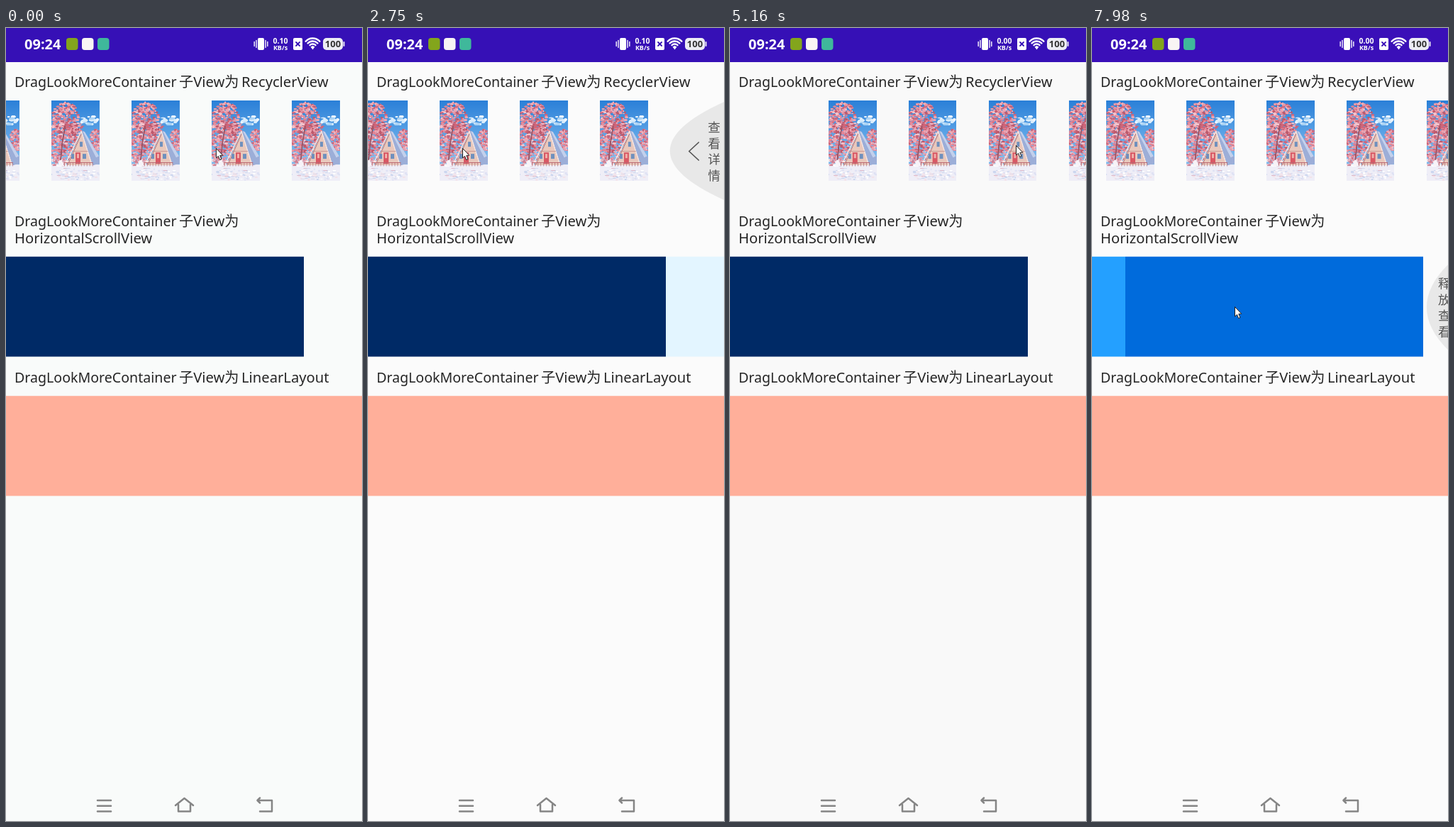
An HTML page with a canvas for the animation above (8 s loop, 502 by 1116 pixels).

```html
<!DOCTYPE html>
<html lang="zh">
<head>
<meta charset="utf-8">
<style>
  html, body { margin: 0; width: 502px; height: 1116px; overflow: hidden; background: #f9f9f9; }
  canvas { display: block; }
</style>
</head>
<body>
<canvas id="stage" width="502" height="1116"></canvas>
<script>
const LOOP = 8000, W = 502, H = 1116;
const PITCH = 112.9, MARGIN = 20, LAST_ITEM_SCROLL = 633;
const PANE = 420, PANE_TOP = 321.8, PANE_HEIGHT = 140.7, PANE_SCROLL = 1178;
const DAMPING = 0.6;
const ctx = document.getElementById('stage').getContext('2d');
const CJK = '"Noto Sans CJK SC", sans-serif';
const LATIN = '"Noto Sans", ' + CJK;

const ramp = (t, from, to) => Math.min(1, Math.max(0, (t - from) / (to - from)));
const easeOut = u => 1 - (1 - u) ** 2;
const smooth = (t, from, to) => { const u = ramp(t, from, to); return u * u * (3 - 2 * u); };
const bump = (t, start, end, fade) => ramp(t, start, start + fade) * (1 - ramp(t, end - fade, end));
const strokes = (t, from, to, count, size) => size * Math.sin(Math.PI * count * ramp(t, from, to)) ** 2;

// Every drag moves the pointer and, through damping, the content it pulls.
function poseAt(t) {
  const pullLeft = 163 * easeOut(ramp(t, 0, 2650));
  const pullRight = 198 * smooth(t, 4620, 5160);
  const paneDrag = 173 * ramp(t, 5720, 6060);
  const panePull = 70 * ramp(t, 7500, 7980);
  return {
    cursorX: 296 - pullLeft + 72 * smooth(t, 3000, 4300) + strokes(t, 3000, 4300, 3, 80) + pullRight
      - 190 * smooth(t, 5300, 5700) - paneDrag
      + 231 * smooth(t, 6150, 7450) + strokes(t, 6150, 7450, 2, 90) - panePull,
    cursorY: 169 - 4 * ramp(t, 3000, 5160) + 222 * smooth(t, 5300, 5700) + 5 * ramp(t, 6060, 7980),
    listScroll: LAST_ITEM_SCROLL * (1 - smooth(t, 3000, 4250)),
    listStretch: 1 + 0.025 * bump(t, 4200, 4600, 150),
    listPull: DAMPING * (pullLeft * (1 - smooth(t, 2660, 2960)) - pullRight * (1 - smooth(t, 5220, 5450))),
    paneScroll: paneDrag + (PANE_SCROLL - 173) * ramp(t, 6150, 7500),
    panePull: panePull / 2,
    barAlpha: 0.3 * bump(t, 5750, 7800, 200),
    toast: bump(t, 2900, 4950, 150),
    bright: (t >= 2390 && t < 4650) || t >= 5670
  };
}

function rect(g, x, y, w, h, fill, radius = 0) {
  g.fillStyle = fill;
  g.beginPath();
  g.roundRect(x, y, w, h, radius);
  g.fill();
}

function trace(g, points) {
  g.beginPath();
  for (let i = 0; i < points.length; i += 2) g.lineTo(points[i], points[i + 1]);
}

function poly(g, fill, ...points) {
  trace(g, points);
  g.fillStyle = fill;
  g.fill();
}

function line(g, stroke, width, ...points) {
  trace(g, points);
  g.strokeStyle = stroke;
  g.lineWidth = width;
  g.lineJoin = g.lineCap = 'round';
  g.stroke();
}

function text(str, x, y, font, fill, align = 'left') {
  ctx.font = font;
  ctx.fillStyle = fill;
  ctx.textAlign = align;
  ctx.fillText(str, x, y);
}

function makePicture() {
  const scale = 2, pic = document.createElement('canvas');
  pic.width = 68 * scale;
  pic.height = 113 * scale;
  const g = pic.getContext('2d');
  g.scale(scale, scale);
  let seed = 11;
  const rnd = () => (seed = seed * 16807 % 2147483647) / 2147483647;
  const dabs = (count, x, y, rx, ry, size, colors) => {
    for (let i = 0; i < count; i++) {
      const a = rnd() * Math.PI * 2, r = Math.sqrt(rnd());
      g.fillStyle = colors[Math.floor(rnd() * colors.length)];
      g.beginPath();
      g.ellipse(x + Math.cos(a) * r * rx, y + Math.sin(a) * r * ry, size * (0.5 + rnd()), size * (0.4 + rnd() / 2), 0, 0, 7);
      g.fill();
    }
  };
  const sky = g.createLinearGradient(0, 0, 0, 80);
  sky.addColorStop(0, '#2b80d8');
  sky.addColorStop(1, '#7fbdf0');
  rect(g, 0, 0, 68, 113, sky);
  dabs(30, 55, 28, 14, 6, 2.4, ['#d8ecfb', '#a9d2f4', '#eef6fd']);

  const pinks = ['#e08496', '#d0667b', '#eca6b3', '#f4c3cb', '#bd5a6d', '#e5919f'];
  dabs(230, 19, 24, 19, 23, 1.9, pinks);
  dabs(330, 13, 58, 21, 31, 1.9, pinks);
  dabs(110, 36, 44, 10, 13, 1.7, pinks);
  dabs(110, 63, 56, 9, 16, 1.7, pinks);
  line(g, '#9a5565', 1.8, 12, 92, 15, 60, 19, 36);

  rect(g, 0, 90, 68, 23, '#efeef7');
  dabs(45, 9, 87, 14, 5, 1.6, ['#f5e6ec', '#e2b4c0', '#cf8093', '#ffffff']);
  poly(g, '#e9c8bc', 42, 45, 21, 91, 57, 91);
  poly(g, '#9caed8', 42, 43, 46, 43, 68, 79, 68, 89, 57, 91);
  poly(g, '#c3d0ec', 44, 43, 47, 44, 67, 78, 63, 80);
  line(g, '#b0747a', 0.9, 42, 47, 23, 90);
  line(g, '#f8e6e0', 1.4, 19, 90, 42, 43, 57, 90);
  line(g, '#c38a88', 0.8, 30, 71, 51, 71);
  for (const [x, y, w, h] of [[40, 58, 4, 7], [28, 75, 4, 7], [44, 75, 5, 7]]) rect(g, x, y, w, h, '#6f90bd');
  rect(g, 34, 73, 7, 16, '#d95865');
  rect(g, 36, 75, 3, 6, '#eeb0aa');
  line(g, '#c06c74', 1, 18, 87, 58, 87);
  for (let x = 18; x < 60; x += 4) line(g, '#a9606a', 0.6, x, 87, x, 92);

  dabs(70, 34, 104, 36, 8, 1.6, ['#ffffff', '#dfe2f4', '#f3e3ea', '#cbd6ef']);
  for (let i = 0; i < 16; i++) {
    const x = rnd() * 60, y = 95 + rnd() * 16;
    line(g, i % 3 ? '#c9d2ec' : '#dfb7c6', 0.7, x, y, x + 5, y);
  }
  poly(g, '#f7f3f8', 9, 92, 11, 84, 14, 83, 18, 92);
  return pic;
}
const picture = makePicture();

function statusBar(t) {
  const bar = t < 5820 ? '#3610b6' : '#3a0fb8', light = '#fff';
  rect(ctx, 0, 0, W, 48, bar);
  text('09:24', 26, 30, '600 20px ' + LATIN, light);
  ['#83a51c', '#f8f4f4', '#3fb89b'].forEach((fill, i) => rect(ctx, 85 + i * 22, 14, 16.5, 17, fill, 4));

  rect(ctx, 355, 14, 9, 17, light, 2);
  for (const side of [-1, 1]) {
    for (const i of [0, 1]) {
      const x = 359.5 + side * (6.5 + 2.8 * i), half = 5 - 2 * i;
      line(ctx, light, 1.4, x, 22.5 - half, x, 22.5 + half);
    }
  }
  text(t < 3540 ? '0.10' : '0.00', 387, 22, '700 10.5px ' + LATIN, light, 'center');
  text('KB/s', 387, 31, '700 9px ' + LATIN, light, 'center');
  rect(ctx, 405, 14, 13, 17, light, 2);
  for (const d of [-2.5, 2.5]) line(ctx, bar, 1.8, 411.5 - d, 20, 411.5 + d, 25);
  ctx.strokeStyle = light;
  ctx.lineWidth = 2.4;
  for (const r of [5.5, 9.5, 13.5]) {
    ctx.beginPath();
    ctx.arc(432.5, 28, r, -Math.PI * 0.76, -Math.PI * 0.24);
    ctx.stroke();
  }
  poly(ctx, light, 429.5, 26.5, 432.5, 25, 435.5, 26.5, 432.5, 30.5);
  rect(ctx, 447, 14, 28, 17, '#ececf4', 5);
  rect(ctx, 475.5, 19, 2, 7, '#ececf4', 1);
  text('100', 461, 27, '600 13px ' + LATIN, '#333', 'center');
}

function headings() {
  const ink = '#262626', font = '20.2px ' + LATIN;
  for (const [y, tail] of [[83, 'RecyclerView'], [279, ''], [499, 'LinearLayout']]) {
    text('DragLookMoreContainer', 12, y, '19.6px ' + LATIN, ink);
    text('子View为', 244, y, font, ink);
    text(tail, 332, y, font, ink);
  }
  text('HorizontalScrollView', 12, 303, font, ink);
}

function bulge(left, y, half) {
  ctx.fillStyle = '#e8e8e8';
  ctx.beginPath();
  ctx.moveTo(W, y - half);
  ctx.quadraticCurveTo(2 * left - W, y, W, y + half);
  ctx.fill();
}

function pullLabel(ready, x, y) {
  [...(ready ? '释放查看' : '查看详情')].forEach((ch, i) =>
    text(ch, x, y - 27 + i * 22.6, '17.6px ' + CJK, '#555'));
}

function pictureRow(t, pose) {
  const { listPull: pull, listStretch: stretch } = pose;
  for (let i = 0; i < 10; i++) {
    const x = (MARGIN + i * PITCH - pose.listScroll - pull) * stretch;
    ctx.drawImage(picture, x, 102.3, 67.7 * stretch, 113);
  }
  if (pull <= 0) return;
  const left = W - pull;
  if (pose.bright) bulge(left, 173, 69);
  line(ctx, '#555', 1.7, left + 40.5, 161, left + 27, 173.5, left + 40.5, 186);
  pullLabel(t < 2660 && pull > 50, left + 53.5, 173);
}

function colorPanes(pose) {
  const { paneScroll: scroll, panePull: pull } = pose;
  ['#002a66', pose.bright ? '#e3f5ff' : 'transparent', '#24a0ff', '#006bdc'].forEach((fill, i) =>
    rect(ctx, i * PANE - scroll - pull, PANE_TOP, PANE, PANE_HEIGHT, fill));
  rect(ctx, scroll * W / (4 * PANE), 458, 151, 4.5, `rgba(0,0,0,${pose.barAlpha})`);
  if (pull <= 0) return;
  bulge(W - pull * 0.86, 393, 60);
  pullLabel(pull > 15, W - pull + 21, 393);
}

function toast(alpha) {
  ctx.globalAlpha = alpha;
  rect(ctx, 178, 528, 147, 56.5, 'rgba(0,0,0,.53)', 28);
  text('进入更多页面', 251.5, 563, '16.8px ' + CJK, '#fff', 'center');
  ctx.globalAlpha = 1;
}

function navBar() {
  const gray = '#858585', width = 2.5;
  for (const y of [1087, 1094.8, 1102.6]) line(ctx, gray, width, 129, y, 148, y);
  line(ctx, gray, width, 239, 1094, 251.5, 1084, 264, 1094);
  line(ctx, gray, width, 243, 1093, 243, 1102.6, 260, 1102.6, 260, 1093);
  line(ctx, gray, width, 355, 1087, 375, 1087, 375, 1102.6, 358, 1102.6);
  line(ctx, gray, width, 358, 1083.5, 354.5, 1087, 358, 1090.5);
}

function cursor(x, y) {
  ctx.save();
  ctx.translate(x, y);
  const shape = [0.5, 0.5, 0.5, 14, 3.5, 11.3, 5.6, 16.5, 8, 15.5, 5.8, 10.4, 9.8, 10.2];
  poly(ctx, '#fff', ...shape);
  line(ctx, '#222', 1, ...shape, 0.5, 0.5);
  ctx.restore();
}

function draw(t) {
  const pose = poseAt(t);
  rect(ctx, 0, 0, W, H, pose.bright ? '#fbfbfb' : t < 600 ? '#f9fbfa' : '#f9f9f9');
  statusBar(t);
  headings();
  pictureRow(t, pose);
  colorPanes(pose);
  rect(ctx, 0, 517.8, W, PANE_HEIGHT, '#ffaf9a');
  toast(pose.toast);
  navBar();
  cursor(pose.cursorX, pose.cursorY);
}

function tick() {
  draw(performance.now() % LOOP);
  requestAnimationFrame(tick);
}
tick();
</script>
</body>
</html>
```
